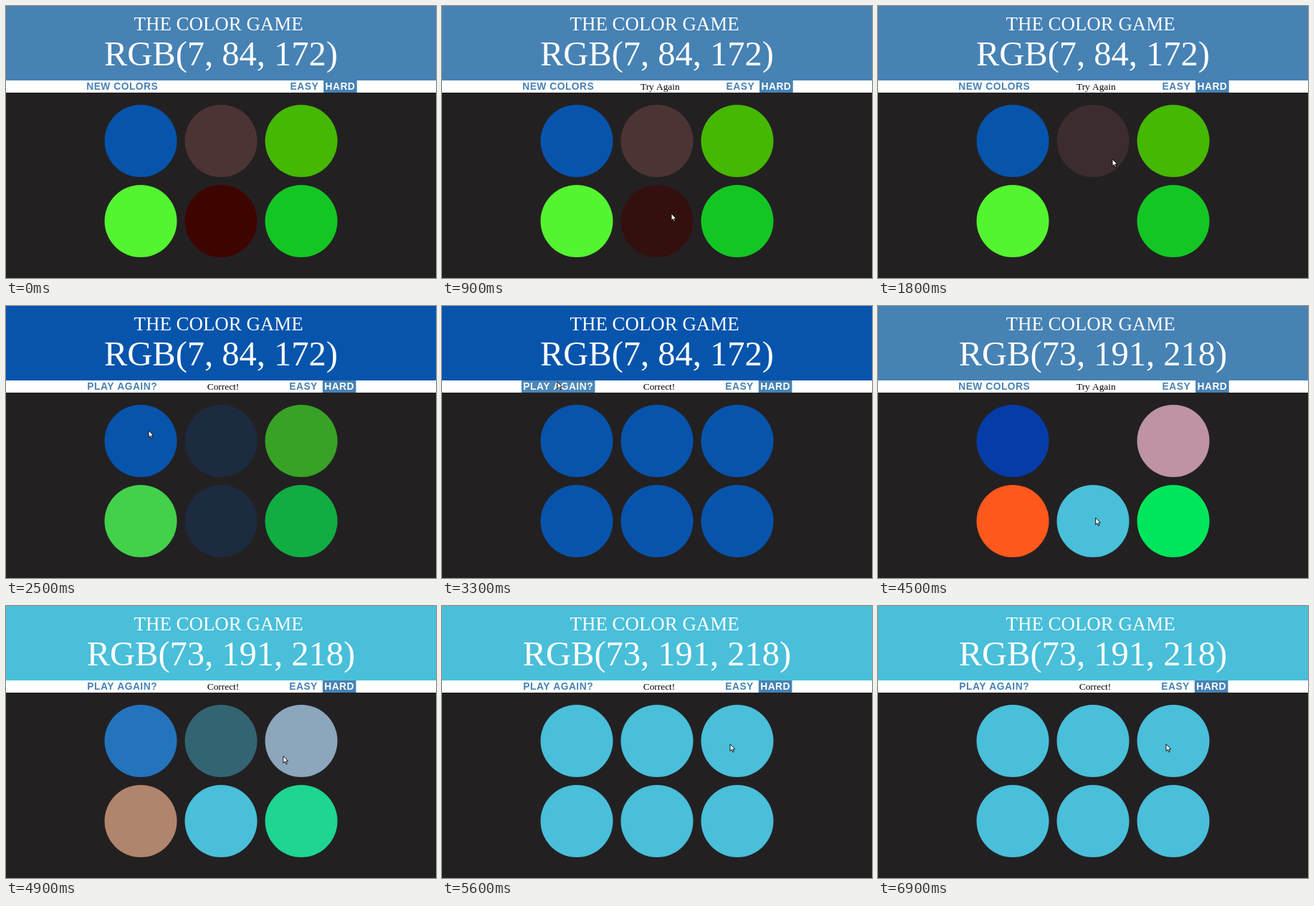
An HTML page with a canvas for the animation above (7.1 s loop, 600 by 380 pixels).

```html
<!DOCTYPE html>
<html lang="en">
<head>
<meta charset="utf-8">
<title>The Color Game</title>
<style>
  html, body { margin: 0; width: 600px; height: 380px; overflow: hidden; background: #232022; }
  canvas { display: block; }
</style>
</head>
<body>
<canvas id="stage" width="600" height="380"></canvas>
<script>
const ctx = document.getElementById('stage').getContext('2d');
const LOOP = 7100, STEP = 100, FADE = 600, TRAVEL = 400, REST = 200;
const BAR = 104, BODY = 121;
const SERIF = '"Liberation Serif", "Times New Roman", serif';
const SANS = '"Liberation Sans", Arial, sans-serif';

const rgb = hex => [0, 2, 4].map(i => parseInt(hex.slice(i, i + 2), 16));
const STEEL = rgb('4682b4'), WHITE = rgb('ffffff'), BLACK = rgb('000000'), DARK = rgb('232022');
const ROUNDS = [
  { goal: 0, colors: '0754ac 4d3434 45b802 54f430 3e0500 14c624'.split(' ').map(rgb) },
  { goal: 4, colors: '063ca8 766b1e be93a5 ff581c 49bfda 00e65c'.split(' ').map(rgb) }
];

// Each click: the pointer arrives REST ms before it
const CLICKS = [
  { at: 750, x: 320, y: 290 },
  { at: 1650, x: 327, y: 214 },
  { at: 2401, x: 199, y: 174 },
  { at: 3340, x: 161, y: 106 },
  { at: 3950, x: 267, y: 183 },
  { at: 4745, x: 305, y: 300 },
  { at: 5200, x: 402, y: 193 }
];
const onButton = click => click.y < BODY;
const circleAt = ({ x, y }) => Math.floor((x - 132) / 112) + (y > 244 ? 3 : 0);

const mix = (a, b, p) => a.map((v, i) => v + (b[i] - v) * p);
const css = color => `rgb(${color.map(Math.round)})`;
const clamp = x => Math.min(1, Math.max(0, x));

// CSS "ease": cubic-bezier(.25, .1, .25, 1)
function ease(x) {
  x = clamp(x);
  const curve = (u, a, b) => 3 * u * (1 - u) ** 2 * a + 3 * u * u * (1 - u) * b + u ** 3;
  let lo = 0, hi = 1;
  for (let i = 0; i < 20; i++) {
    const mid = (lo + hi) / 2;
    if (curve(mid, .25, .25) < x) lo = mid; else hi = mid;
  }
  return curve(hi, .1, 1);
}

// Replays the game up to time t
function play(t) {
  let round = 0, note = '', won = false, hover = 0;
  let circles = ROUNDS[0].colors;
  for (const click of CLICKS) {
    const p = ease((t - click.at) / FADE);
    if (onButton(click)) {
      hover = t < click.at ? ease((t - click.at + 500) / FADE) : 1 - p;
    }
    if (click.at > t) continue;
    if (onButton(click)) {
      round++;
      note = '';
      won = false;
      circles = circles.map((c, i) => mix(c, ROUNDS[round].colors[i], p));
    } else if (!won) {
      const { goal, colors } = ROUNDS[round], hit = circleAt(click);
      won = hit === goal;
      note = won ? 'Correct!' : 'Try Again';
      circles = circles.map((c, i) => won ? mix(c, colors[goal], p) : i === hit ? mix(c, DARK, p) : c);
    }
  }
  const { goal, colors } = ROUNDS[round];
  return { goal: colors[goal], note, won, hover, circles };
}

function rect(color, x, y, w, h) {
  ctx.fillStyle = css(color);
  ctx.fillRect(x, y, w, h);
}

function text(str, x, y, size, color) {
  ctx.font = `${size}px ${SERIF}`;
  ctx.textAlign = 'center';
  ctx.letterSpacing = '0px';
  ctx.fillStyle = css(color);
  ctx.fillText(str, x, y);
}

// Text blends to white as its steel background fills in
function button(str, cx, active) {
  ctx.font = `bold 13.8px ${SANS}`;
  ctx.textAlign = 'left';
  ctx.letterSpacing = '0.5px';
  const pad = 2.4, w = ctx.measureText(str).width + 2 * pad, x = cx - w / 2;
  rect(mix(WHITE, STEEL, active), x, BAR, w, BODY - BAR);
  ctx.fillStyle = css(mix(STEEL, WHITE, active));
  ctx.fillText(str, x + pad, 117);
}

function pointer(t) {
  let tip = [640, 400];
  for (const { at, x, y } of CLICKS) {
    const p = clamp((t - at + REST + TRAVEL) / TRAVEL);
    tip = mix(tip, [x, y], p * p * (3 - 2 * p));
  }
  ctx.save();
  ctx.translate(...tip);
  const arrow = new Path2D('M0 0V9.6L2.2 7.6 3.8 11.2 5.3 10.5 3.8 7.1 6.8 6.9Z');
  ctx.fillStyle = '#fff';
  ctx.strokeStyle = '#000';
  ctx.lineWidth = .9;
  ctx.fill(arrow);
  ctx.stroke(arrow);
  ctx.restore();
}

function draw(t) {
  const { goal, note, won, hover, circles } = play(t);
  const shift = won ? -1.3 : 0;

  rect(DARK, 0, 0, 600, 380);
  rect(won ? goal : STEEL, 0, 0, 600, BAR);
  rect(WHITE, 0, BAR, 600, BODY - BAR);
  text('THE COLOR GAME', 296.6, 34, 26.9, WHITE);
  text(`RGB(${goal.join(', ')})`, 300, 83, 48.5, WHITE);

  button(won ? 'PLAY AGAIN?' : 'NEW COLORS', 162.2, hover);
  button('EASY', 416.3 + shift, 0);
  button('HARD', 466.4 + shift, 1);
  text(note, won ? 303 : 304.3, 117, 13.3, BLACK);

  circles.forEach((color, i) => {
    ctx.fillStyle = css(color);
    ctx.beginPath();
    ctx.arc(188 + i % 3 * 112, i < 3 ? 188.5 : 300.5, 50.5, 0, 7);
    ctx.fill();
  });
  pointer(t);
}

const begin = performance.now();
function tick() {
  const t = (performance.now() - begin) % LOOP;
  draw(Math.floor(t / STEP) * STEP);
  requestAnimationFrame(tick);
}
tick();
</script>
</body>
</html>
```
